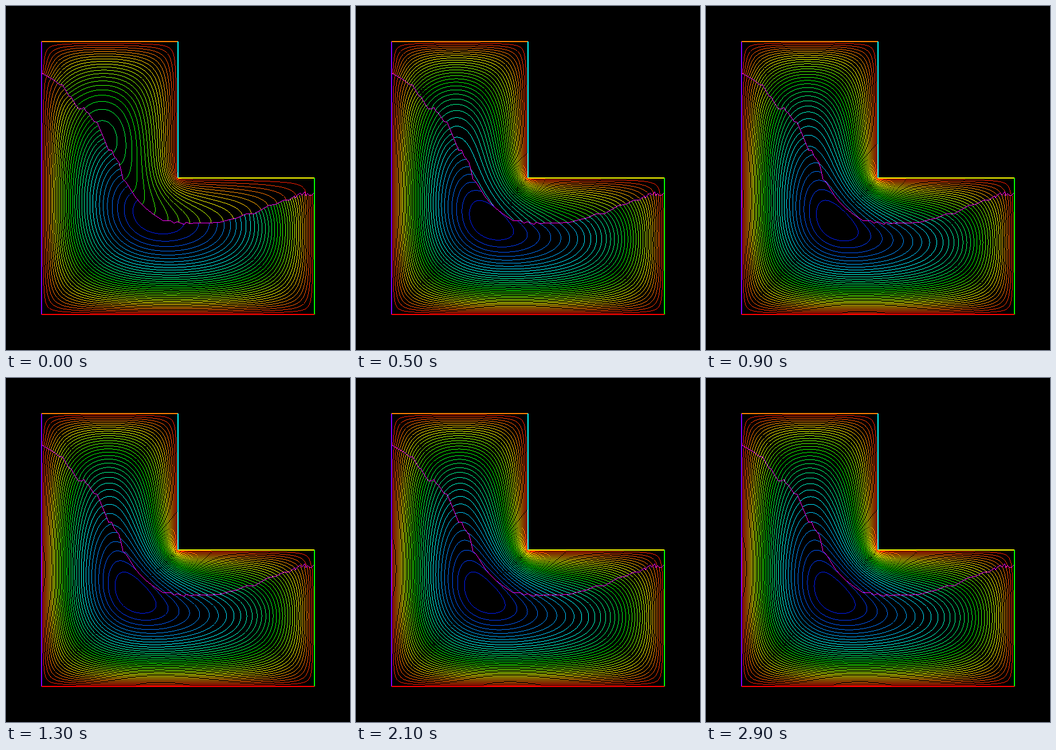
An HTML page with a canvas that plays this animation: 600 by 600 pixels, repeating every 3 s.

```html
<!DOCTYPE html>
<html lang="en">
<head>
<meta charset="utf-8">
<title>Two-part Poisson solve on an L</title>
<style>
html, body { margin: 0; width: 100%; height: 100%; overflow: hidden; background: #000; }
canvas { display: block; width: 600px; height: 600px; }
</style>
</head>
<body>
<canvas id="stage" width="600" height="600"></canvas>
<script>
const LO = 62, MID = 300, HI = 538, SIZE = HI - LO;
const COLS = 80, WALL = 60, NECK = 20, LOW = 60;   // mesh resolution
const STEPS = 30, STEP_MS = 100, LEVELS = 36, RELAX = 0.5;

// Seam between the two subdomains, as x,y pairs.
const seam = [
  62,117, 78,126, 86,131, 93,137, 99,138, 104,147, 110,157, 114,159, 121,172,
  126,179, 131,180, 136,177, 139,183, 144,187, 153,201, 159,203, 164,215,
  170,229, 179,252, 184,251, 188,261, 197,273, 201,288, 204,302, 210,308,
  218,321, 226,334, 235,344, 243,352, 254,361, 275,375, 286,374, 294,379,
  298,376, 311,381, 314,377, 322,380, 330,378, 361,378, 374,377, 388,373,
  402,370, 420,362, 434,362, 446,355, 458,348, 470,346, 484,339, 495,338,
  503,331, 505,335, 508,330, 513,326, 516,330, 521,324, 523,331, 526,327,
  529,330, 533,330, 538,325
];

function seamAt(x) {
  x = Math.min(HI, Math.max(LO, x));
  let i = 0;
  while (i < seam.length - 4 && seam[i + 2] < x) i += 2;
  const f = (x - seam[i]) / (seam[i + 2] - seam[i]);
  return seam[i + 1] + f * (seam[i + 3] - seam[i + 1]);
}

const colX = i => LO + SIZE * i / (2 * COLS);
const colSeam = Array.from({ length: 2 * COLS + 1 }, (_, i) => {
  const x = colX(i);
  return [-6, -3, 0, 3, 6].reduce((s, d) => s + seamAt(x + d), 0) / 5;
});
const bend = (MID - LO) / (colSeam[COLS] - LO);

function upperY(i, j) {
  const c = colSeam[i];
  if (i > COLS) return MID + (c - MID) * (j - WALL) / NECK;
  const s = j <= WALL ? bend * j / WALL : bend + (1 - bend) * (j - WALL) / NECK;
  return LO + (c - LO) * s;
}
const lowerY = (i, j) => colSeam[i] + (HI - colSeam[i]) * j / LOW;

// Linear finite elements on a column mesh, with a banded Cholesky factor.
function makePart(first, last, yAt, fixed, seamRow) {
  const X = [], Y = [], free = [], ids = [], tris = [];
  let n = 0;
  for (let i = 0; i <= 2 * COLS; i++) {
    ids.push([]);
    for (let j = first(i); j <= last; j++) {
      ids[i][j] = X.length;
      X.push(colX(i));
      Y.push(yAt(i, j));
      free.push(i === 0 || i === 2 * COLS || fixed(i, j) ? -1 : n++);
    }
  }
  const dist = (a, b) => Math.hypot(X[a] - X[b], Y[a] - Y[b]);
  for (let i = 0; i < 2 * COLS; i++) {
    for (let j = Math.max(first(i), first(i + 1)); j < last; j++) {
      const a = ids[i][j], b = ids[i + 1][j], c = ids[i + 1][j + 1], d = ids[i][j + 1];
      if (dist(a, c) < dist(b, d)) tris.push([a, b, c], [a, c, d]);
      else tris.push([a, b, d], [b, c, d]);
    }
  }

  const band = last + 3, w = band + 1;
  const A = new Float64Array(n * w), load = new Float64Array(n);
  for (const t of tris) {
    const [a, b, c] = t;
    const ex = [X[c] - X[b], X[a] - X[c], X[b] - X[a]];
    const ey = [Y[c] - Y[b], Y[a] - Y[c], Y[b] - Y[a]];
    const area = Math.abs(ex[0] * ey[1] - ex[1] * ey[0]) / 2;
    for (let p = 0; p < 3; p++) {
      const r = free[t[p]];
      if (r < 0) continue;
      load[r] += area / 3 / (SIZE * SIZE);
      for (let q = 0; q < 3; q++) {
        const s = free[t[q]];
        if (s >= 0 && s <= r) A[r * w + s - r + band] += (ex[p] * ex[q] + ey[p] * ey[q]) / (4 * area);
      }
    }
  }
  for (let i = 0; i < n; i++) {
    const ri = i * w - i + band, lo = Math.max(0, i - band);
    for (let j = lo; j <= i; j++) {
      const rj = j * w - j + band;
      let s = A[ri + j];
      for (let k = lo; k < j; k++) s -= A[ri + k] * A[rj + k];
      A[ri + j] = i === j ? Math.sqrt(s) : s / A[rj + j];
    }
  }

  const edge = ids.map(col => col[seamRow]);
  function solve(flux, sign) {
    const x = load.slice();
    for (let i = 0; i < 2 * COLS; i++) {
      const len = dist(edge[i], edge[i + 1]) / SIZE;
      const p = free[edge[i]], q = free[edge[i + 1]];
      if (p >= 0) x[p] += sign * len * (2 * flux[i] + flux[i + 1]) / 6;
      if (q >= 0) x[q] += sign * len * (flux[i] + 2 * flux[i + 1]) / 6;
    }
    for (let i = 0; i < n; i++) {
      const r = i * w - i + band;
      let s = x[i];
      for (let k = Math.max(0, i - band); k < i; k++) s -= A[r + k] * x[k];
      x[i] = s / A[r + i];
    }
    for (let i = n - 1; i >= 0; i--) {
      const r = i * w - i + band;
      x[i] /= A[r + i];
      for (let k = Math.max(0, i - band); k < i; k++) x[k] -= A[r + k] * x[i];
    }
    return Float64Array.from(free, f => f < 0 ? 0 : x[f]);
  }
  return { X, Y, tris, edge, solve };
}

const upper = makePart(i => i > COLS ? WALL : 0, WALL + NECK, upperY,
  (i, j) => i > COLS ? j === WALL : j === 0 || (i === COLS && j <= WALL), WALL + NECK);
const lower = makePart(() => 0, LOW, lowerY, (i, j) => j === LOW, 0);

// Each step corrects the seam flux by the jump across the seam.
const flux = new Float64Array(2 * COLS + 1);
const states = [];
for (let k = 0; k < STEPS; k++) {
  const up = upper.solve(flux, -1), low = lower.solve(flux, 1);
  states.push({ up, low });
  for (let i = 0; i < flux.length; i++) {
    flux[i] += RELAX * (up[upper.edge[i]] - low[lower.edge[i]]);
  }
}

const ctx = document.getElementById("stage").getContext("2d");
const image = ctx.createImageData(600, 600);
const pixels = new Uint32Array(image.data.buffer);
const BLACK = 0xff000000, MAGENTA = 0xffff00ff;

const unit = v => Math.round(255 * Math.min(1, Math.max(0, v)));
const colors = Array.from({ length: LEVELS + 1 }, (_, n) => {
  const h = 4 * n / LEVELS;
  return (BLACK | unit(h - 2) << 16 | unit(Math.min(h, 4 - h)) << 8 | unit(2 - h)) >>> 0;
});

// Hard-edged one-pixel line.
function line(x0, y0, x1, y1, color) {
  const flat = Math.abs(x1 - x0) >= Math.abs(y1 - y0);
  let [a, b, c, d] = flat ? [x0, y0, x1, y1] : [y0, x0, y1, x1];
  if (a > c) [a, b, c, d] = [c, d, a, b];
  const slope = (d - b) / (c - a);
  for (let p = Math.ceil(a - 0.5); p < c - 0.5; p++) {
    const q = Math.floor(b + (p + 0.5 - a) * slope);
    pixels[flat ? q * 600 + p : p * 600 + q] = color;
  }
}

function contours({ X, Y, tris }, u, gap) {
  const cut = (p, q, v) => {
    const f = (v - u[p]) / (u[q] - u[p]);
    return [X[p] + f * (X[q] - X[p]), Y[p] + f * (Y[q] - Y[p])];
  };
  for (const t of tris) {
    let [a, b, c] = t;
    if (u[a] > u[b]) [a, b] = [b, a];
    if (u[b] > u[c]) [b, c] = [c, b];
    if (u[a] > u[b]) [a, b] = [b, a];
    const top = Math.min(LEVELS - 1, Math.floor(u[c] / gap));
    for (let n = Math.max(1, Math.ceil(u[a] / gap)); n <= top; n++) {
      const v = n * gap;
      if (u[a] === u[c]) continue;
      const [x0, y0] = cut(a, c, v);
      const [x1, y1] = v < u[b] || u[b] === u[c] ? cut(a, b, v) : cut(b, c, v);
      line(x0, y0, x1, y1, colors[n]);
    }
  }
}

const walls = [
  ["#8000ff", LO, LO, LO, HI], ["#ff8000", LO, LO, MID, LO],
  ["#00ffff", MID, LO, MID, MID], ["#ffff00", MID, MID, HI, MID],
  ["#00ff00", HI, MID, HI, HI], ["#ff0000", LO, HI, HI, HI]
];

function draw(k) {
  const { up, low } = states[k];
  const peak = Math.max(up.reduce((a, b) => Math.max(a, b)), low.reduce((a, b) => Math.max(a, b)));
  pixels.fill(BLACK);
  contours(upper, up, peak / LEVELS);
  contours(lower, low, peak / LEVELS);
  for (let i = 0; i < seam.length - 2; i += 2) {
    line(seam[i], seam[i + 1], seam[i + 2], seam[i + 3], MAGENTA);
  }
  ctx.putImageData(image, 0, 0);
  ctx.lineWidth = 2;
  for (const [color, x0, y0, x1, y1] of walls) {
    ctx.strokeStyle = color;
    ctx.beginPath();
    ctx.moveTo(x0, y0);
    ctx.lineTo(x1, y1);
    ctx.stroke();
  }
}

let shown = -1;
const start = performance.now();
function tick() {
  const k = Math.floor((performance.now() - start) / STEP_MS) % STEPS;
  if (k !== shown) draw(shown = k);
  requestAnimationFrame(tick);
}
tick();
</script>
</body>
</html>
```
